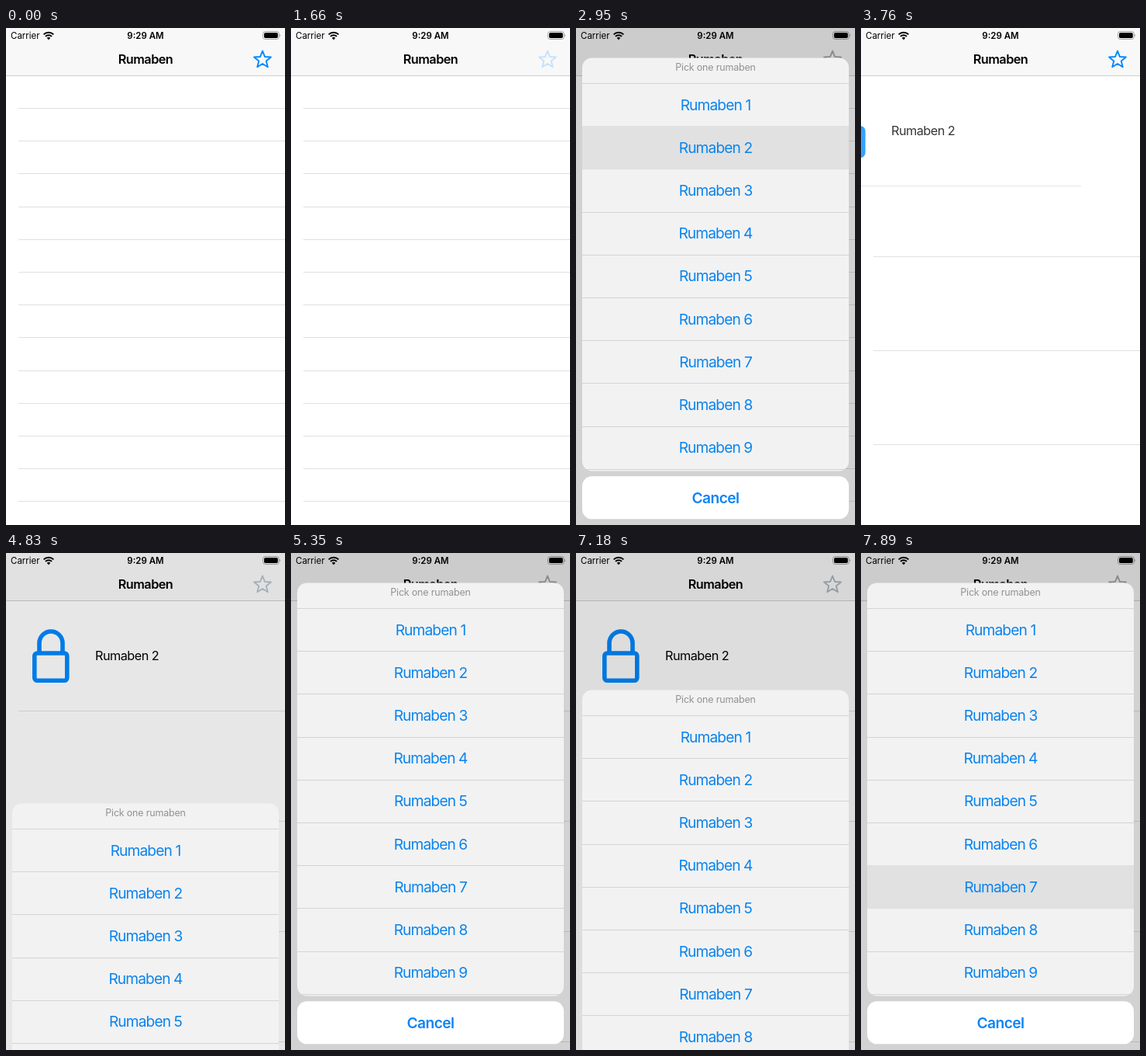
Recreate the animation shown at these times as an HTML page. Size 360 by 640 pixels, loop 8000 ms.

```html
<!DOCTYPE html>
<html lang="en">
<head>
<meta charset="utf-8">
<title>List with action sheet</title>
<style>
  html, body { margin: 0; height: 100%; overflow: hidden; background: #fff; }
  svg { display: block; width: 100vw; height: 100vh; font: 16.3px Inter, sans-serif; letter-spacing: -.55px; }
  .mid { text-anchor: middle; }
  .bold { font-weight: 600; }
  .small { font-size: 11.5px; letter-spacing: 0; }
  .hint { font-size: 12.5px; letter-spacing: -.2px; fill: #929292; }
  .option { font-size: 19.2px; letter-spacing: -.9px; fill: #0a84ee; }
  .cancel { font-size: 19.2px; letter-spacing: -.6px; fill: #0a84f5; }
  .stroke { fill: none; stroke-linejoin: round; }
</style>
</head>
<body>
<svg id="stage" viewBox="0 0 360 640"></svg>
<script>
const LOOP = 8000, NAME = 'Rumaben', BLUE = '#0088ff';
const TOP = 61.2, SMALL_ROW = 42.2, ROW = 142, OPTION_TOP = 71.5, OPTION = 55.2;

// The screen refreshes in bursts: [start, interval, number of further steps]
const BURSTS = [
  [0, 1, 0], [1370, 1, 0], [1650, 110, 7], [2950, 115, 7], [4120, 1, 0], [4400, 108, 6],
  [5240, 110, 7], [6450, 1, 0], [6720, 113, 6], [7890, 1, 0]
];
// One visit to the sheet: star tap, sheet motion, chosen option, row insertion
const VISITS = [
  { tap: 1370, rise: [1640, 2377], pick: 2950, option: 2, fall: [3080, 3600], insert: [3590, 3827] },
  { tap: 4120, rise: [4385, 5040], pick: 5240, option: 6, fall: [5360, 5850], insert: [5840, 6000] },
  { tap: 6450, rise: [6705, 7390], pick: 7890, option: 7, fall: [8100, 8600], insert: [8600, 8800] }
];

const sample = t => {
  const [start, interval, steps] = BURSTS.findLast(b => b[0] <= t);
  return start + interval * Math.min(steps, Math.floor((t - start) / interval));
};
const ease = (t, [from, to]) => {
  const x = Math.min(1, Math.max(0, (t - from) / (to - from)));
  return (1 - Math.cos(Math.PI * x)) / 2;
};
const repeat = (n, draw) => Array.from({ length: n }, (_, i) => draw(i)).join('');
const rect = (x, y, w, h, fill, r = 0) =>
  `<rect x="${x}" y="${y}" width="${w}" height="${h}" rx="${r}" fill="${fill}"/>`;
const text = (x, y, cls, str) => `<text x="${x}" y="${y}" class="${cls}">${str}</text>`;
const separator = (x, y) => rect(x, Math.floor(y), 344, 1, '#e0e0e0');

const starPath = 'M' + repeat(10, i => {
  const r = i % 2 ? 5 : 11.5, a = i * Math.PI / 5;
  return `${331 + r * Math.sin(a)} ${41 - r * Math.cos(a)} `;
}) + 'Z';

const lock = `<g class="stroke" stroke="${BLUE}" stroke-width="5.6">
  <rect x="36.8" y="129" width="42" height="35.2" rx="3.5"/>
  <path d="M43 129V116a15 15 0 0 1 30 0V129"/></g>`;

const wifi = `<path d="M55 15.2l-2.3-2.4a3.3 3.3 0 0 1 4.6 0z"/>
  <path class="stroke" stroke="#000" stroke-width="2" d="M50.9 10.9a5.9 5.9 0 0 1 8.2 0M48.6 8.4a9.2 9.2 0 0 1 12.8 0"/>`;

const battery = `<rect class="stroke" x="331.5" y="4.5" width="20.8" height="10" rx="3" stroke="#a4a4a4"/>
  ${rect(333, 6, 17.8, 7, '#000', 1.8)}<path d="M353.3 7.7q2 1.8 0 3.6z" fill="#a4a4a4"/>`;

function table(t) {
  const inserted = VISITS.map(v => ease(t, v.insert));
  const height = SMALL_ROW + (ROW - SMALL_ROW) * inserted[0];
  const blankTop = TOP + ROW * (inserted[0] + inserted[1]);
  const blanks = repeat(inserted[0] ? 3 : 13, i => separator(16, blankTop + height * (i + 1)));
  const rows = repeat(2, i => {
    const p = inserted[i];
    return p && `<g transform="translate(${360 * (p - 1)} ${ROW * i})" opacity="${p}">
      ${lock}${text(115, 138, '', `${NAME} ${VISITS[i].option}`)}${separator(16, TOP + ROW)}</g>`;
  });
  return blanks + rows;
}

function bar(star) {
  return rect(0, 0, 360, 61, '#f8f8f8') + rect(0, 61, 360, 1, '#cfcfcf')
    + text(180, 46.3, 'mid bold', NAME)
    + `<path d="${starPath}" class="stroke" stroke-width="1.9" style="stroke:${star}"/>`;
}

const statusBar = text(6, 14.2, 'small', 'Carrier') + wifi
  + text(180, 14.2, 'small mid bold', '9:29 AM') + battery;

function sheet(shown, picked) {
  const lineY = i => Math.floor(OPTION_TOP + OPTION * i);
  return `<g transform="translate(0 ${Math.round(602 * (1 - shown))})">
    ${rect(8, 38.4, 344, 532, '#f2f2f2', 12.5)}
    ${repeat(10, i => rect(8, lineY(i), 344, 1, '#d4d4d4'))}
    ${picked ? rect(8, lineY(picked - 1), 344, OPTION + 1, '#e1e1e1') : ''}
    ${text(180, 54.8, 'mid hint', `Pick one ${NAME.toLowerCase()}`)}
    ${repeat(9, i => text(180, 105.5 + OPTION * i, 'mid option', `${NAME} ${i + 1}`))}
    ${rect(8, 577.3, 344, 55, '#fff', 12.5)}
    ${text(180, 611.7, 'mid cancel bold', 'Cancel')}</g>`;
}

function picture(t) {
  const visit = VISITS.findLast(v => v.tap <= t);
  let shown = 0, star = BLUE, picked = 0;
  if (visit) {
    shown = ease(t, visit.rise) - ease(t, visit.fall);
    const base = t < visit.pick ? '#c6e1fa' : BLUE;
    star = `color-mix(in srgb, #a8a8a8 ${100 * shown}%, ${base})`;
    if (t >= visit.pick && t < visit.pick + 110) picked = visit.option;
  }
  return rect(0, 0, 360, 640, '#fff') + table(t) + bar(star) + statusBar
    + (shown ? `<rect width="360" height="640" opacity="${.175 * shown}"/>` + sheet(shown, picked) : '');
}

const stage = document.getElementById('stage');
let last = -1;
function frame() {
  const t = sample(performance.now() % LOOP);
  if (t !== last) stage.innerHTML = picture(last = t);
  requestAnimationFrame(frame);
}
frame();
</script>
</body>
</html>
```
